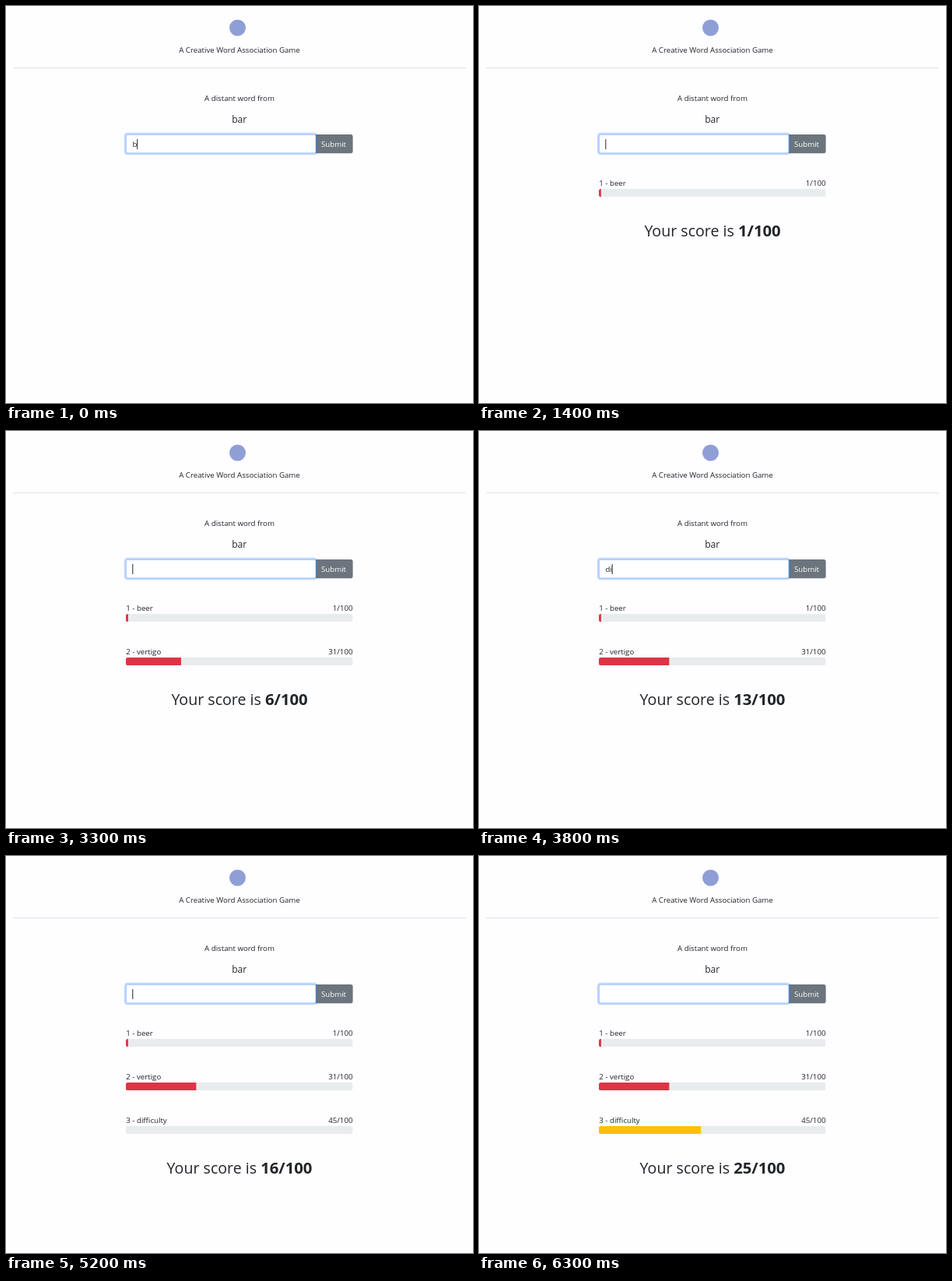
An HTML page that plays this animation: 600 px wide and 510 px high, repeating every 6.4 s.

```html
<!DOCTYPE html>
<html lang="en">
<head>
<meta charset="utf-8">
<title>Word association game</title>
<style>
  html, body { margin: 0; width: 100%; height: 100%; overflow: hidden; background: #fefdff; }
  svg { display: block; width: 600px; height: 510px; }
  text { font: 9.7px "Open Sans", "Noto Sans", sans-serif; fill: #212529; white-space: pre; }
  .mid { text-anchor: middle; }
  .end { text-anchor: end; }
  .word { font-size: 12.1px; }
  .score { font-size: 19.6px; }
  .score tspan { font-size: 20.3px; font-weight: 700; }
</style>
</head>
<body>
<svg viewBox="0 0 600 510">
  <defs>
    <clipPath id="track"><rect x="154" y="235" width="291.5" height="10" rx="2.6"/></clipPath>
  </defs>
  <circle cx="297.5" cy="28" r="10.5" fill="#8f9fd6"/>
  <text class="mid" x="300" y="60">A Creative Word Association Game</text>
  <rect x="9" y="79" width="582" height="1" fill="#e5e5e8"/>
  <text class="mid" x="300" y="121.8">A distant word from</text>
  <text class="mid word" x="299.7" y="150.2">bar</text>

  <path d="M398 165h45a2.6 2.6 0 0 1 2.6 2.6v19a2.6 2.6 0 0 1-2.6 2.6h-45z" fill="#6c757d"/>
  <rect x="153" y="164" width="246" height="26" rx="3" fill="none" stroke="#0d6efd" stroke-opacity=".25" stroke-width="2.4"/>
  <rect x="154.3" y="165.3" width="243.6" height="23.6" rx="2" fill="#fff" stroke="#86b7fe" stroke-width=".8"/>
  <text id="typed" x="162.5" y="181"></text>
  <rect id="caret" y="171" width="1" height="13" fill="#212529"/>
  <text class="mid" x="421" y="181" style="fill:#fff">Submit</text>

  <g id="rows"></g>
  <text id="score" class="mid score" x="300" y="296.2">Your score is <tspan></tspan></text>
</svg>
<script>
const LOOP = 6400, STEP = 100, BLINK = 560, PITCH = 56, TRACK = 291.5;
const RED = '#dc3545', AMBER = '#ffc107';

// Input contents: [time, text, caret hidden]
const keys = [
  [0, 'b'], [100, 'be'], [200, 'bee'], [300, 'beer'], [900, ''],
  [1600, 'v'], [1700, 've'], [1800, 'ver'], [1900, 'vert'], [2000, 'verti'],
  [2100, 'vertif'], [2200, 'vertifo', true], [2300, 'vertif'], [2400, 'verti'],
  [2600, 'vertig'], [2700, 'vertigo'], [3000, ''],
  [3700, 'd'], [3800, 'di'], [3900, 'dif'], [4000, 'diff'], [4100, 'diffi'],
  [4200, 'diffic'], [4300, 'difficu'], [4400, 'difficult'], [4500, 'difficulty'],
  [5200, '']
];

const guesses = [
  { at: 900, word: 'beer', points: 1, from: 0, to: 1, color: RED },
  { at: 3000, word: 'vertigo', points: 31, from: 1, to: 16, color: RED },
  { at: 5200, word: 'difficulty', points: 45, from: 16, to: 25, color: AMBER }
];

const $ = id => document.getElementById(id);
const clamp = v => Math.max(0, Math.min(1, v));

// CSS "ease": cubic-bezier(.25, .1, .25, 1)
function ease(x) {
  if (x <= 0 || x >= 1) return clamp(x);
  const bezier = (a, b, s) => 3 * a * s * (1 - s) ** 2 + 3 * b * s * s * (1 - s) + s ** 3;
  let lo = 0, hi = 1;
  for (let i = 0; i < 20; i++) {
    const mid = (lo + hi) / 2;
    if (bezier(.25, .25, mid) < x) lo = mid; else hi = mid;
  }
  return bezier(.1, 1, lo);
}

$('rows').innerHTML = guesses.map((g, i) => `
  <g transform="translate(0 ${i * PITCH})">
    <text x="154.3" y="231.3">${i + 1} - ${g.word}</text>
    <text class="end" x="445.5" y="231.3">${g.points}/100</text>
    <g clip-path="url(#track)">
      <rect x="154" y="235" width="${TRACK}" height="10" fill="#e9ecef"/>
      <rect class="bar" x="154" y="235" height="10" fill="${g.color}"/>
    </g>
  </g>`).join('');

const rows = [...$('rows').children];
const bars = rows.map(row => row.querySelector('.bar'));
const typed = $('typed'), caret = $('caret'), score = $('score');
const total = score.querySelector('tspan');

function draw(t) {
  const [since, text, hidden] = keys.filter(k => k[0] <= t).pop();
  typed.textContent = text;
  caret.setAttribute('x', 162.3 + (text ? typed.getComputedTextLength() : 0));
  const lit = !hidden && Math.floor((t - since) / BLINK) % 2 === 0;
  caret.style.visibility = lit ? 'visible' : 'hidden';

  let last = -1;
  guesses.forEach((g, i) => {
    const shown = t >= g.at;
    if (shown) last = i;
    rows[i].style.display = shown ? '' : 'none';
    bars[i].setAttribute('width', TRACK * g.points / 100 * ease((t - g.at - 10) / 600));
  });

  score.style.display = last < 0 ? 'none' : '';
  if (last >= 0) {
    const g = guesses[last];
    const value = Math.round(g.from + (g.to - g.from) * clamp((t - g.at - 10) / 960 ));
    total.textContent = value + '/100';
    score.setAttribute('y', 296.2 + last * PITCH);
  }
}

const start = performance.now();
function tick() {
  const t = (performance.now() - start) % LOOP;
  draw(Math.floor(t / STEP) * STEP);
  requestAnimationFrame(tick);
}
tick();
</script>
</body>
</html>
```
